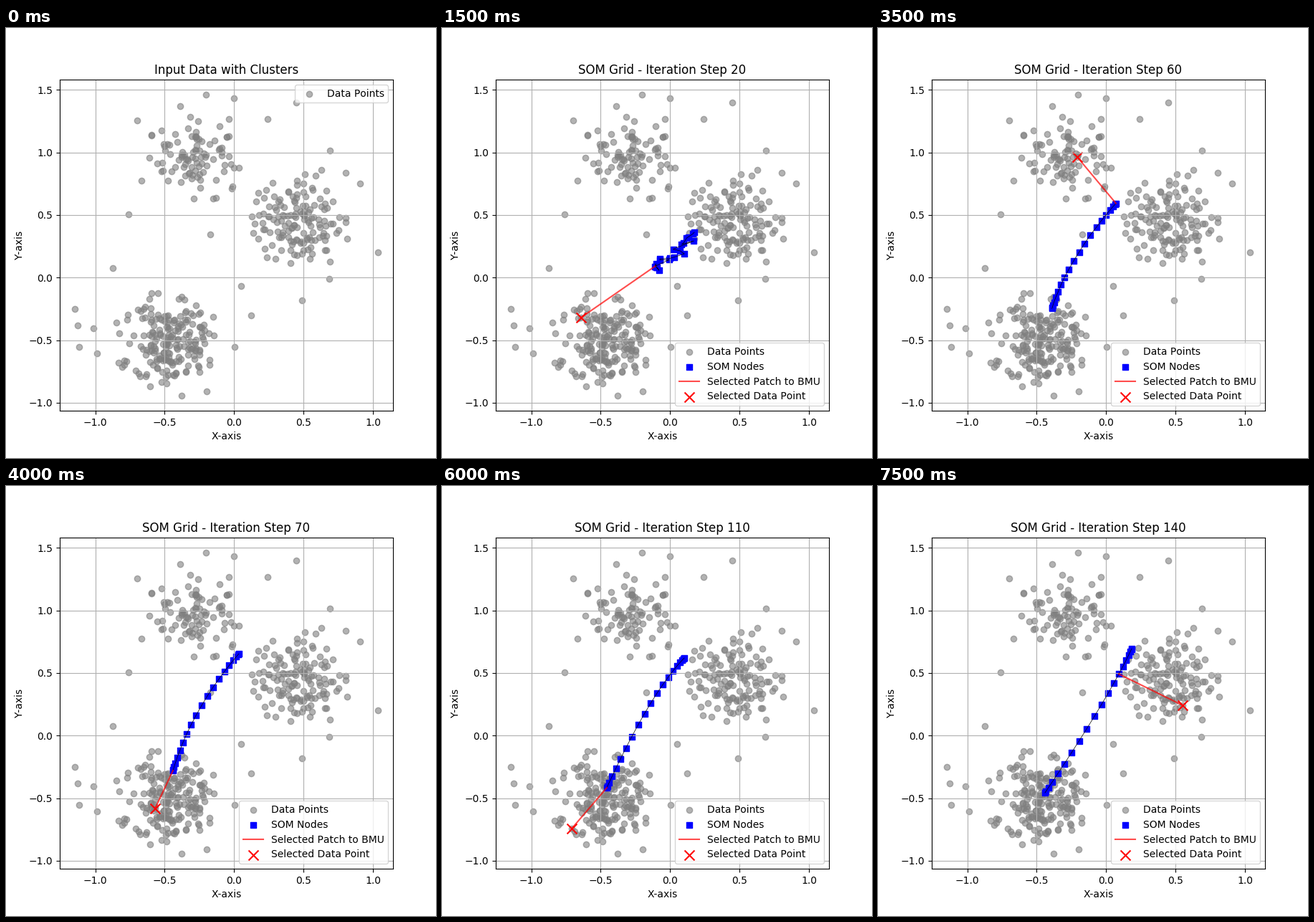
Recreate the animation shown at these times as a matplotlib script. Size 600 by 600 pixels, loop 8000 ms.

```python
import matplotlib.pyplot as plt
import numpy as np
from matplotlib.animation import FuncAnimation

NODES = 20
STEP = 10
FRAMES = 16
XLIM = (-1.256, 1.144)
YLIM = (-1.0635, 1.5812)

plt.rcParams["text.kerning_factor"] = 6
rng = np.random.default_rng(7)


def to_data(points):
    """Stage pixels to data units."""
    x, y = np.asarray(points, float).T
    return np.column_stack([np.interp(x, (75, 540), XLIM),
                            np.interp(y, (72, 534), YLIM[::-1])])


def cluster(center, count, sigma=0.185, reach=2.2):
    """Gaussian cloud without its far tail."""
    z = rng.normal(size=(2 * count, 2))
    return center + sigma * z[np.hypot(*z.T) < reach][:count]


# Loose points that shape the outline of the clouds
strays = [
    (279, 93), (318, 98), (405, 104), (365, 127), (183, 129), (189, 213),
    (171, 260), (285, 288), (494, 217), (519, 313), (452, 171), (452, 326),
    (451, 350), (413, 380), (342, 401), (328, 360), (96, 392), (100, 415),
    (102, 445), (127, 454), (122, 419), (149, 335), (245, 513), (280, 507),
    (319, 445)]

# Data point selected at each shown step
picks = to_data([
    (474, 202), (397, 261), (194, 404), (154, 411), (293, 237),
    (158, 426), (278, 180), (208, 450), (388, 250), (223, 461),
    (232, 470), (181, 478), (298, 168), (227, 428), (425, 306)])

data = np.vstack([cluster((-0.27, 1.0), 92), cluster((0.46, 0.5), 138),
                  cluster((-0.47, -0.5), 185), to_data(strays), picks])

# Top, middle and bottom of the node chain at key steps
key_steps = [0, 20, 40, 70, 90, 110, 140]
keys = np.array([
    [(440, 300), (365, 375), (230, 440)],
    [(352, 285), (326, 318), (300, 334)],
    [(346, 266), (292, 330), (262, 380)],
    [(325, 234), (269, 313), (233, 397)],
    [(358, 246), (305, 311), (241, 405)],
    [(338, 240), (287, 310), (230, 421)],
    [(354, 227), (307, 313), (233, 428)]])

t = np.linspace(0, 1, NODES)
ease = (1 - np.cos(np.pi * t)) / 2
bend = np.column_stack([(1 - ease) * (1 - 2 * ease),
                        4 * ease * (1 - ease),
                        ease * (2 * ease - 1)])
scatter = (rng.uniform(-1, 1, (NODES, 2)) * (120, 75)
           * np.sqrt(np.sin(np.pi * t).clip(0))[:, None])


def chain_at(step):
    """Eased arc through three moving points; early disorder fades out."""
    flat = keys.reshape(len(keys), -1).T
    arc = np.reshape([np.interp(step, key_steps, k) for k in flat], (3, 2))
    return to_data(bend @ arc + scatter * np.exp(-step / 10.5))


def draw_som(step):
    nodes = chain_at(step)
    pick = picks[step // STEP]
    bmu = nodes[np.argmin(np.hypot(*(nodes - pick).T))]
    ax.scatter(*nodes.T, color="blue", marker="s", label="SOM Nodes")
    ax.plot(*nodes.T, color="black", lw=0.5)
    ax.plot(*np.array([pick, bmu]).T, color="red", alpha=0.7,
            label="Selected Patch to BMU")
    ax.scatter(*pick, color="red", marker="x", s=100,
               label="Selected Data Point")


def update(frame):
    ax.clear()
    ax.scatter(*data.T, color="gray", alpha=0.6, label="Data Points")
    if frame == 0:
        title, loc = "Input Data with Clusters", "upper right"
    else:
        step = (frame - 1) * STEP
        draw_som(step)
        title, loc = f"SOM Grid - Iteration Step {step}", "lower right"
    ax.set(title=title, xlabel="X-axis", ylabel="Y-axis",
           xlim=XLIM, ylim=YLIM)
    ax.set_xticks(np.arange(-1, 1.1, 0.5))
    ax.set_yticks(np.arange(-1, 1.6, 0.5))
    ax.grid(True)
    ax.legend(loc=loc)


fig, ax = plt.subplots(figsize=(6, 6), dpi=100)
anim = FuncAnimation(fig, update, frames=FRAMES, interval=500,
                     repeat=True, repeat_delay=0)
plt.show()
```
